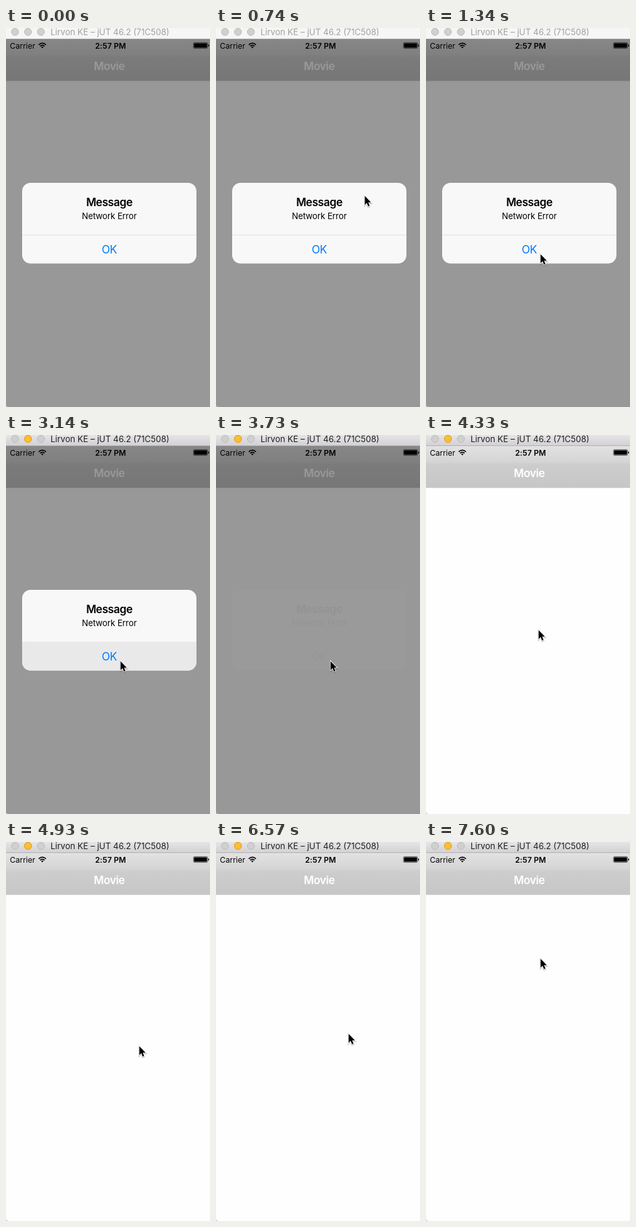
An HTML page that plays this animation: 316x585 px, repeating every 8000 ms.

```html
<!DOCTYPE html>
<html lang="en">
<head>
<meta charset="utf-8">
<title>Alert dismissal</title>
<style>
  html, body { margin: 0; width: 100%; height: 100%; overflow: hidden; background: #bdbdbd; }
  svg { display: block; width: 316px; height: 585px; font-family: Inter, Roboto, sans-serif; }
  .mid { text-anchor: middle; }
  .head { font-size: 17px; font-weight: 600; letter-spacing: -.45px; }

  /* Every change is a hard cut */
  .active, .dim, .alert, .pressed, .cursor { animation: 8s step-end infinite; }
  .active { animation-name: activate; }
  .dim { animation-name: undim; }
  .alert { animation-name: dismiss; }
  .pressed { animation-name: press; }
  .cursor { animation-name: move; }

  @keyframes activate { 0% { opacity: 0 } 39.25%, 100% { opacity: 1 } }
  @keyframes undim { 0% { opacity: 1 } 54.125%, 100% { opacity: 0 } }
  @keyframes dismiss { 0% { opacity: 1 } 46.625% { opacity: .03 } 48.5%, 100% { opacity: 0 } }
  @keyframes press { 0% { opacity: 0 } 39.25% { opacity: 1 } 44.75%, 100% { opacity: 0 } }
  @keyframes move {
    0% { transform: translate(-40px, 0) }
    7.375% { transform: translate(234px, 22px) }
    9.25% { transform: translate(229px, 258px) }
    11.125% { transform: translate(196px, 365px) }
    13% { transform: translate(192px, 373px) }
    14.875% { transform: translate(178px, 355px) }
    16.75% { transform: translate(176px, 348px) }
    48.5% { transform: translate(176px, 344px) }
    50.375% { transform: translate(177px, 329px) }
    52.25% { transform: translate(177px, 320px) }
    54.125% { transform: translate(173px, 300px) }
    61.625% { transform: translate(205px, 314px) }
    82.125% { transform: translate(204px, 295px) }
    84% { transform: translate(186px, 256px) }
    85.875% { transform: translate(178px, 247px) }
    87.75% { transform: translate(184px, 240px) }
    89.5% { transform: translate(189px, 210px) }
    91.375% { transform: translate(183px, 193px) }
    93.125% { transform: translate(178px, 184px) }
    95%, 100% { transform: translate(176px, 179px) }
  }
</style>
</head>
<body>
<svg viewBox="0 0 316 585">
  <defs>
    <linearGradient id="nav" x2="0" y2="1">
      <stop stop-color="#e2e2e2"/>
      <stop offset=".37" stop-color="#d5d5d5"/>
      <stop offset=".45" stop-color="#cdcdcd"/>
      <stop offset="1" stop-color="#c6c6c6"/>
    </linearGradient>
    <linearGradient id="bar" x2="0" y2="1">
      <stop stop-color="#e6e4e6"/>
      <stop offset="1" stop-color="#d2d0d2"/>
    </linearGradient>
    <clipPath id="card"><rect x="25" y="239" width="270" height="124.5" rx="13"/></clipPath>
    <path id="screen" d="M0 17H316V585H4Q0 585 0 581Z"/>
    <circle id="light" cy="6" r="5.5"/>
    <text id="title" x="69" y="11" font-size="13">Lirvon KE – jUT 46.2 (71C508)</text>
    <path id="arrow" d="M1.5 1.3V15L4.6 12.1L6.8 17.2L9 16.3L6.9 11.2H11.2Z"/>
  </defs>

  <!-- App screen -->
  <use href="#screen" fill="#fefefe"/>
  <rect y="17" width="316" height="64" fill="url(#nav)"/>
  <rect y="81" width="316" height=".5" fill="#b4b4b4"/>
  <text class="mid head" x="160" y="65" fill="#fff">Movie</text>
  <use class="dim" href="#screen" fill="#000" fill-opacity=".4"/>

  <!-- Status bar -->
  <g font-size="12">
    <text x="6" y="31.5">Carrier</text>
    <text class="mid" x="162" y="31.5" font-weight="600" letter-spacing=".1">2:57 PM</text>
  </g>
  <g fill="none" stroke="#000" stroke-width="1.6">
    <path d="M50.7 25.9Q56.3 20.7 61.9 25.9M52.8 28.1Q56.3 25 59.8 28.1"/>
    <path d="M54.4 29.3Q56.3 28 58.2 29.3L56.3 31.4Z" fill="#000" stroke="none"/>
    <rect x="290.3" y="22.5" width="22" height="9" rx="1.6" stroke-width=".5"/>
    <rect x="291.2" y="23.4" width="20.2" height="7.2" rx=".8" fill="#000" stroke="none"/>
    <path d="M313 25.4Q314.6 25.8 314.6 27.1T313 28.8Z" fill="#000" stroke="none"/>
  </g>

  <!-- Window title bar -->
  <rect width="316" height="17" fill="#f6f6f6"/>
  <rect y="16" width="316" height="1" fill="#d4d4d4"/>
  <use href="#title" fill="#a0a0a0"/>
  <g class="active">
    <rect width="316" height="17" fill="url(#bar)"/>
    <rect y="16" width="316" height="1" fill="#b3b1b3"/>
    <use href="#title" fill="#1e1e1e"/>
  </g>
  <g fill="#d0d0d0" stroke="#bababa">
    <use href="#light" x="14"/>
    <use href="#light" x="34"/>
    <use href="#light" x="54"/>
    <use class="active" href="#light" x="34" fill="#fdbe2f" stroke="#dea025"/>
  </g>

  <!-- Alert -->
  <g class="alert">
    <g clip-path="url(#card)">
      <rect x="25" y="239" width="270" height="125" fill="#f8f8f8"/>
      <rect x="25" y="319" width="270" height="1" fill="#e2e2e2"/>
      <rect class="pressed" x="25" y="319" width="270" height="45" fill="#e9e9e9"/>
    </g>
    <text class="mid head" x="160" y="275">Message</text>
    <text class="mid" x="160" y="295" font-size="13" letter-spacing="-.1">Network Error</text>
    <text class="mid" x="160" y="348" font-size="17" letter-spacing="-.4" fill="#007aff">OK</text>
  </g>

  <!-- Pointer with its soft shadow -->
  <g class="cursor" paint-order="stroke">
    <use href="#arrow" y="1" stroke="#000" stroke-width="2.4" opacity=".22"/>
    <use href="#arrow" stroke="#fff" stroke-width="1.6"/>
  </g>
</svg>
</body>
</html>
```
